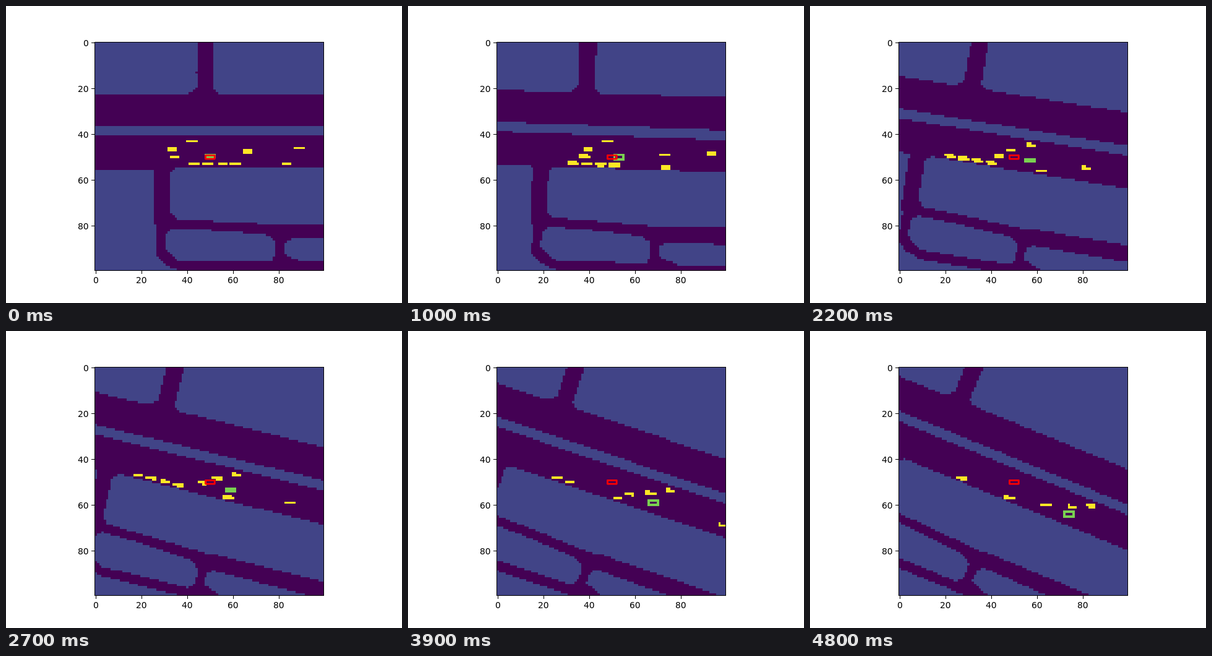
An HTML page with a canvas that plays this animation: 640x480 px, repeating every 4.9 s.

```html
<!DOCTYPE html>
<html lang="en">
<head>
<meta charset="utf-8">
<title>Traffic grid</title>
<style>
  html, body { margin: 0; width: 100%; height: 100%; overflow: hidden; background: #fff; }
  canvas { display: block; }
</style>
</head>
<body>
<canvas id="stage" width="640" height="480"></canvas>
<script>
const LOOP = 4.9, FPS = 10, N = 100;
const CELL = 3.696, LEFT = 143.2, TOP = 57.6, MIDDLE = 50.5;
const ROAD = '#440154', LEAD = '#7ad151';
const BLOCK = [65, 68, 135], CAR = [253, 231, 37];

// Own car: time in seconds, heading in degrees, distance along the road
const DRIVE = [[0, 0, 50.5], [1, 2.1, 60.6], [1.7, 4.9, 67.5], [2.7, 13.8, 75],
  [3.4, 15.7, 76.7], [3.9, 18.7, 79.4], [4.8, 22.3, 83.5]];

// Other cars keep a steady speed in world cells per second
const car = (x, y, speed = 0, drift = 0, until = LOOP) => ({ x, y, speed, drift, until });
const parked = (x, until) => car(x, 53.75, 0, 0, until);
const cars = [
  car(42.7, 43.3, 15.8), car(34, 46.9, 16.1), car(35, 50.4, 13.6),
  car(67, 48, 16.4, 0.55), car(89.5, 46.5, 14.5, 1, 1.5),
  parked(43.5, 3), parked(49.5, 3), parked(55.8, 4.3), parked(61.7), parked(84.1)
];
const leader = car(50.6, 50.33, 12.6);

// City blocks in world cells
const blocks = [
  'M-99-99H45L44.5 14V20L42 22L40 22.8H-99Z',
  'M52-99V20.5L54 22.5H200V-99Z',
  'M-99 36.8H200V41H-99Z',
  'M35.3 55.3H200V80L86 79.4L80 80L52 78.5L36 77.8L33 75V57.5Z',
  'M34 81.8L51 82.5L75 84.3L79 87.5V93.5L77 96.3H37L31 91V84.5Z',
  'M86 86.4L140 87.2H200V96.3H91L83 93.3V88Z',
  'M-99 55.7H26V80L27 81V94L31 97.6L38 100.4H200V200H-99Z'
].map(d => new Path2D(d));

const stage = document.getElementById('stage').getContext('2d');

function makeGrid() {
  const canvas = document.createElement('canvas');
  canvas.width = canvas.height = N;
  return canvas.getContext('2d', { willReadFrequently: true });
}
const grid = makeGrid(), mask = makeGrid();

function drive(t) {
  const k = DRIVE.findIndex((_, i) => DRIVE[i + 1][0] >= t);
  const [a, b] = [DRIVE[k], DRIVE[k + 1]];
  const f = (t - a[0]) / (b[0] - a[0]);
  const [, heading, x] = a.map((v, i) => v + (b[i] - v) * f);
  return { heading, x, y: 50.5 - 4 * (t / 4.8) ** 2 };
}

// Colours every cell that the drawing covers at least half
function paint(out, color, draw) {
  mask.resetTransform();
  mask.clearRect(0, 0, N, N);
  draw();
  const { data } = mask.getImageData(0, 0, N, N);
  for (let i = 0; i < data.length; i += 4) {
    if (data[i + 3] > 127) out.data.set(color, i);
  }
}

function drawGrid(t) {
  const ego = drive(t);
  const view = new DOMMatrix().translate(MIDDLE, MIDDLE).rotate(ego.heading).translate(-ego.x, -ego.y);
  const locate = c => view.transformPoint({ x: c.x + c.speed * t, y: c.y + c.drift * t });

  grid.fillStyle = ROAD;
  grid.fillRect(0, 0, N, N);
  const out = grid.getImageData(0, 0, N, N);
  paint(out, BLOCK, () => {
    mask.setTransform(view);
    blocks.forEach(b => mask.fill(b));
  });
  paint(out, CAR, () => {
    for (const c of cars.filter(c => t < c.until)) {
      const { x, y } = locate(c);
      mask.setTransform(new DOMMatrix().translate(x, y).rotate(ego.heading * 0.4));
      mask.fillRect(-2.3, -0.73, 4.6, 1.46);
    }
  });
  grid.putImageData(out, 0, 0);

  // The leading car is an outline one cell thick
  const { x, y } = locate(leader);
  const x0 = Math.round(x - 2.5), y0 = Math.round(y - 1.15);
  const h = Math.round(y + 1.15) - y0;
  grid.fillStyle = LEAD;
  grid.fillRect(x0, y0, 5, h);
  grid.fillStyle = ROAD;
  grid.fillRect(x0 + 1, y0 + 1, 3, h - 2);
}

function drawAxes() {
  stage.strokeStyle = stage.fillStyle = '#000';
  stage.lineWidth = 1;
  stage.strokeRect(143.5, 58.5, 370, 369);
  stage.font = '13.89px "DejaVu Sans", sans-serif';
  for (let v = 0; v < N; v += 20) {
    const x = LEFT + (v + 0.5) * CELL, y = TOP + (v + 0.5) * CELL;
    const width = stage.measureText(v).width;
    stage.fillRect(Math.round(x), 428, 1, 5);
    stage.fillRect(138, Math.round(y), 5, 1);
    stage.fillText(v, Math.round(x - width / 2), 448);
    stage.fillText(v, Math.round(133.5 - width), Math.round(y + 5.5));
  }
}

function render(t) {
  drawGrid(t);
  stage.fillStyle = '#fff';
  stage.fillRect(0, 0, 640, 480);
  stage.save();
  stage.beginPath();
  stage.rect(143, 58, 371, 370);
  stage.clip();
  stage.imageSmoothingEnabled = false;
  stage.drawImage(grid.canvas, LEFT, TOP, N * CELL, N * CELL);
  stage.restore();

  stage.strokeStyle = '#f00';
  stage.lineWidth = 2.78;
  stage.lineJoin = 'round';
  stage.strokeRect(LEFT + 48.5 * CELL, TOP + 49.75 * CELL, 4 * CELL, 1.5 * CELL);
  stage.lineJoin = 'miter';
  drawAxes();
}

let shown = -1;
function tick() {
  const step = Math.floor(performance.now() / 1000 % LOOP * FPS);
  if (step !== shown) render((shown = step) / FPS);
  requestAnimationFrame(tick);
}
tick();
</script>
</body>
</html>
```
